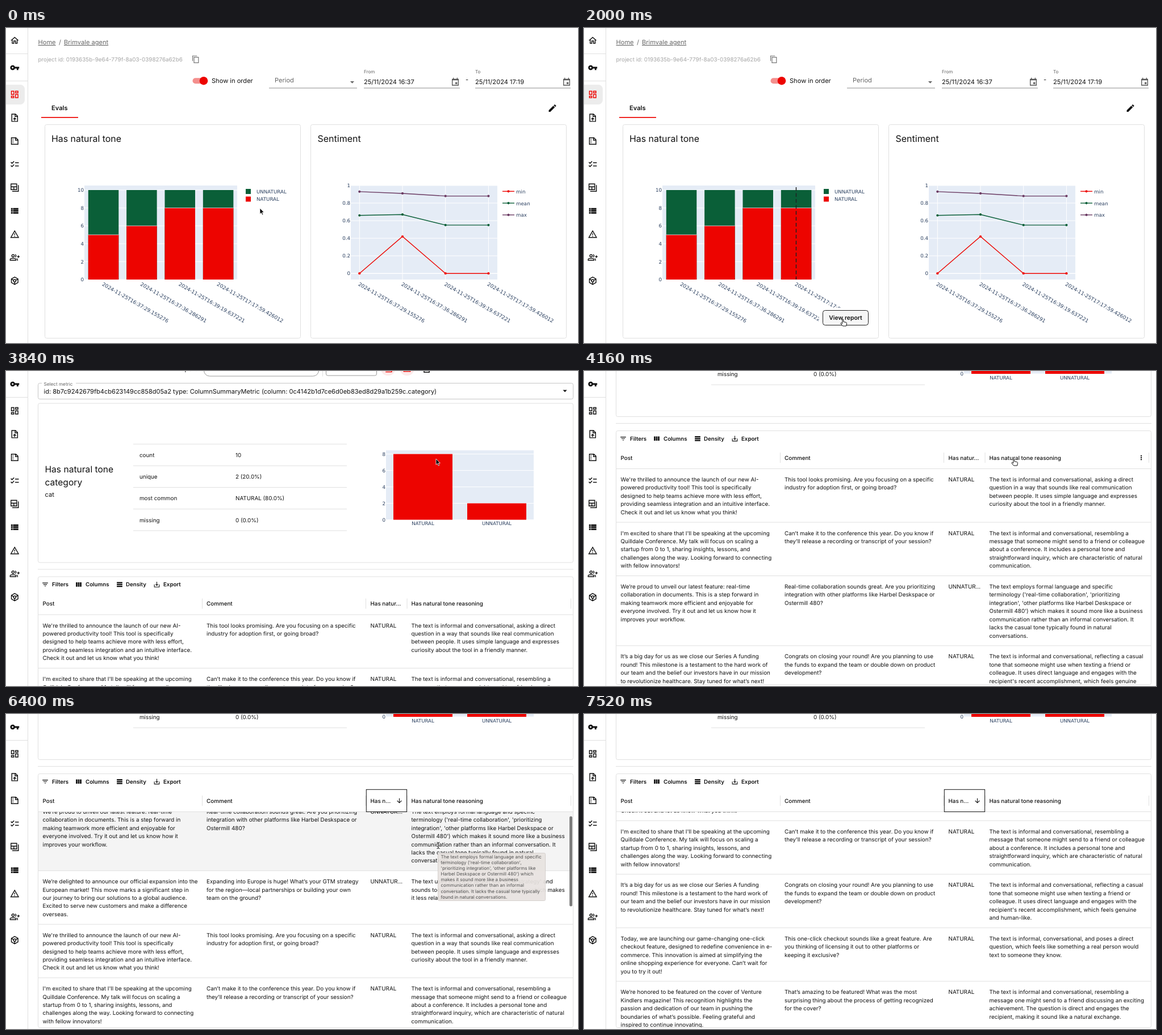
These frames come from a looping animation (1007 by 556 pixels, 7680 ms). An HTML page:

```html
<!DOCTYPE html>
<html lang="en">
<head>
<meta charset="utf-8">
<title>Evals dashboard</title>
<style>
  html, body { margin: 0; width: 100%; height: 100%; overflow: hidden; background: #fff; }
  svg { display: block; width: 1007px; height: 556px; }
  text { font-family: Inter, sans-serif; fill: #111; white-space: pre; text-rendering: geometricPrecision; }
  .plot { font-family: "DejaVu Sans", sans-serif; fill: #2a3f5f; }
  .end { text-anchor: end; }
  .mid { text-anchor: middle; }
  .med { font-weight: 500; }
  .bold { font-weight: 600; }
  .link { fill: #666; text-decoration: underline; }
  .dim { fill: #666; }
  .pale { fill: #a6a6a6; }
</style>
</head>
<body>
<svg id="stage" viewBox="0 0 1007 556" xmlns="http://www.w3.org/2000/svg"></svg>
<script>
const LOOP = 7680, SCROLL = 349, ROWS_TOP = 521.5, LINE = 14.42, PAD = 22.4;
const RED = '#ed0400', GREEN = '#0a5f38', PURPLE = '#6a3a62', GREY = '#e0e0e0', PLOT = '#e5ecf6', INK = '#111';
const BODY = 11.1, SMALL = 9.85, TICK = 8.7;

const outline = {
  home: 'M6 19V11H4.6L12 4.35 19.4 11H18v8h-4v-6h-4v6z',
  dash: 'M4 4h6v8H4zM14 4h6v4h-6zM14 12h6v8h-6zM4 16h6v4H4z',
  upload: 'M14 3H5v18h14V8zM13 3v6h6M12 19v-6M8.7 15.7 12 12.4l3.3 3.3',
  note: 'M15 4H4v16h16V9zM14 4v6h6M7 8h2M7 12h2M7 16h2',
  check: 'M13 8h9M13 16h9M2.7 6.8l2.8 2.8 5-5M2.7 14.8l2.8 2.8 5-5',
  table: 'M3 3h14v14H3zM3 10h14M10 10v7M21 6v15H6',
  warn: 'M12 4 2.7 20h18.6zM12 10v4M12 16v2',
  people: 'M11 8a3 3 0 1 1-6 0 3 3 0 0 1 6 0zM1 19v-2c0-4 14-4 14 0v2zM13 5c3 .5 3 5.5 0 6M17 14.5c2 1 2 2 2 5.5M21 7v6M18 10h6',
  cube: 'M12 3l8 4.5v9L12 21l-8-4.5v-9zM4 7.5l5 3M20 7.5l-5 3M12 21v-6M15 12a3 3 0 1 1-6 0 3 3 0 0 1 6 0z',
  copy: 'M16 2H3v15M7 6h13v16H7z',
  event: 'M4 5h16v16H4zM4 7h16M7 1v4M17 1v4M13 14h3v3h-3z',
  filter: 'M3 7h18M6 12h12M10 17h4',
  save: 'M4 12v8h16v-8M12 3v12M8 11l4 4 4-4',
  down: 'M12 4v15M5 12l7 7 7-7'
};
const solid = {
  key: 'M12.65 10a6 6 0 1 0 0 4H17v4h4v-4h2v-4zM5 12a2 2 0 1 0 4 0 2 2 0 1 0-4 0z',
  list: 'M3 5h4v4H3zM8 5h13v4H8zM3 10h4v4H3zM8 10h13v4H8zM3 15h4v4H3zM8 15h13v4H8z',
  pencil: 'M3 17.25V21h3.75L17.81 9.94l-3.75-3.75zM20.71 7.04a1 1 0 0 0 0-1.41l-2.34-2.34a1 1 0 0 0-1.41 0l-1.83 1.83 3.75 3.75z',
  columns: 'M3 5h5v14H3zM9.5 5h5v14h-5zM16 5h5v14h-5z',
  density: 'M3 4h18v4H3zM3 10h18v4H3zM3 16h18v4H3z',
  drop: 'M7 10l5 5 5-5z',
  dots: 'M10 4h4v4h-4zM10 10h4v4h-4zM10 16h4v4h-4z'
};

// Post | comment | label | reasoning, one entry per table row
const employs = ['The text employs formal language and specific'];
const rows = [
  [["We're thrilled to announce the launch of our new AI-", 'powered productivity tool! This tool is specifically', 'designed to help teams achieve more with less effort,', 'providing seamless integration and an intuitive interface.', 'Check it out and let us know what you think!'],
   ['This tool looks promising. Are you focusing on a specific', 'industry for adoption first, or going broad?'], 'NATURAL',
   ['The text is informal and conversational, asking a direct', 'question in a way that sounds like real communication', 'between people. It uses simple language and expresses', 'curiosity about the tool in a friendly manner.']],
  [["I'm excited to share that I'll be speaking at the upcoming", 'Quilldale Conference. My talk will focus on scaling a', 'startup from 0 to 1, sharing insights, lessons, and', 'challenges along the way. Looking forward to connecting', 'with fellow innovators!'],
   ['Can’t make it to the conference this year. Do you know if', 'they’ll release a recording or transcript of your session?'], 'NATURAL',
   ['The text is informal and conversational, resembling a', 'message that someone might send to a friend or colleague', 'about a conference. It includes a personal tone and', 'straightforward inquiry, which are characteristic of natural', 'communication.']],
  [['We’re proud to unveil our latest feature: real-time', 'collaboration in documents. This is a step forward in', 'making teamwork more efficient and enjoyable for', 'everyone involved. Try it out and let us know how it', 'improves your workflow.'],
   ['Real-time collaboration sounds great. Are you prioritizing', 'integration with other platforms like Harbel Deskspace or', 'Ostermill 480?'], 'UNNATUR...',
   [...employs, "terminology ('real-time collaboration', 'prioritizing", "integration', 'other platforms like Harbel Deskspace or", "Ostermill 480') which makes it sound more like a business", 'communication rather than an informal conversation. It', 'lacks the casual tone typically found in natural', 'conversations.']],
  [['It’s a big day for us as we close our Series A funding', 'round! This milestone is a testament to the hard work of', 'our team and the belief our investors have in our mission', 'to revolutionize healthcare. Stay tuned for what’s next!'],
   ['Congrats on closing your round! Are you planning to use', 'the funds to expand the team or double down on product', 'development?'], 'NATURAL',
   ['The text is informal and conversational, reflecting a casual', 'tone that someone might use when texting a friend or', 'colleague. It uses direct language and engages with the', "recipient's recent accomplishment, which feels genuine", 'and human-like.']],
  [['We’re delighted to announce our official expansion into the', 'European market! This move marks a significant step in', 'our journey to bring our solutions to a global audience.', 'Excited to serve new customers and make a difference', 'overseas.'],
   ['Expanding into Europe is huge! What’s your GTM strategy', 'for the region—local partnerships or building your own', 'team on the ground?'], 'UNNATUR...',
   ["The text uses business jargon like 'GTM strategy' and", 'sounds too formal for a casual conversation, which makes', 'it less relatable and natural.']],
  [['Today, we are launching our game-changing one-click', 'checkout feature, designed to redefine convenience in e-', 'commerce. This innovation is aimed at simplifying the', 'online shopping experience for everyone. Can’t wait for', 'you to try it out!'],
   ['This one-click checkout sounds like a great feature. Are', 'you thinking of licensing it out to other platforms or', 'keeping it exclusive?'], 'NATURAL',
   ['The text is informal, conversational, and poses a direct', 'question, which feels like something a real person would', 'text to someone they know.']],
  [['We’re honored to be featured on the cover of Venture', 'Kindlers magazine! This recognition highlights the', 'passion and dedication of our team in pushing the', 'boundaries of what’s possible. Feeling grateful and', 'inspired to continue innovating.'],
   ['That’s amazing to be featured! What was the most', 'surprising thing about the process of getting recognized', 'for the cover?'], 'NATURAL',
   ['The text is informal and conversational, resembling a', 'message one might send to a friend discussing an exciting', 'achievement. The question is direct and engages the', 'recipient, making it sound like a natural exchange.']]
];
const orders = { none: [0, 1, 2, 3, 4, 5, 6], asc: [0, 1, 3, 5, 6, 2, 4], desc: [2, 4, 0, 1, 3, 5, 6] };
const heights = rows.map(r => Math.max(r[0].length, r[1].length, r[3].length) * LINE + PAD);

// Drawing helpers; text is placed by the middle of its capitals
const text = (x, y, size, str, cls = '', extra = '') =>
  `<text x="${x}" y="${y + size * .36}" font-size="${size}" class="${cls}" ${extra}>${str}</text>`;
const rect = (x, y, w, h, fill = 'none', stroke = 'none', r = 0, extra = '') =>
  `<rect x="${x}" y="${y}" width="${w}" height="${h}" rx="${r}" fill="${fill}" stroke="${stroke}" ${extra}/>`;
const line = (x1, y1, x2, y2, color = GREY, w = 1, extra = '') =>
  `<path d="M${x1} ${y1}L${x2} ${y2}" stroke="${color}" stroke-width="${w}" ${extra}/>`;
const dot = (x, y, r, fill) => `<circle cx="${x}" cy="${y}" r="${r}" fill="${fill}"/>`;
const icon = (name, x, y, size = 17.3, color = INK, id = '') => {
  const look = outline[name] ? `fill="none" stroke="${color}" stroke-width="2"` : `fill="${color}" fill-rule="evenodd"`;
  return `<path id="${id}" transform="translate(${x - size / 2} ${y - size / 2}) scale(${size / 24})" d="${outline[name] || solid[name]}" ${look}/>`;
};
const group = (id, body, extra = '') => `<g id="${id}" ${extra}>${body}</g>`;
const para = (x, y, lines) => lines.map((s, i) => text(x, y + i * LINE, SMALL, s)).join('');

function sidebar() {
  const names = ['home', 'key', 'dash', 'upload', 'note', 'check', 'table', 'list', 'warn', 'people', 'cube'];
  return rect(-8, 100, 41, 35, '#ececec', 'none', 8, 'id="picked"') +
    line(0, 45.5, 38, 45.5) + line(0, 93.5, 38, 93.5) +
    names.map((n, i) => icon(n, 15.3, i < 2 ? 22 + 48 * i : 117.3 + 41.1 * (i - 2), 17.3, INK, 'nav-' + n)).join('');
}

function stamps(x, step) {
  return ['16:37:29.155276', '16:37:36.286291', '16:39:19.637221', '17:17:59.426012'].map((s, i) =>
    `<text class="plot" font-size="8.85" transform="translate(${x + i * step} 454) rotate(30)">2024-11-25T${s}</text>`).join('');
}

function barPlot() {
  let s = rect(138, 278, 269, 166, PLOT);
  for (let v = 0; v <= 10; v += 2) {
    const y = 444 - v * 15.8;
    s += line(138, y, 407, y, '#fff') + text(137, y, TICK, v, 'plot end');
  }
  [5, 6, 8, 8].forEach((v, i) => {
    const x = 144.8 + i * 67.35, y = 444 - v * 15.8;
    s += rect(x, 286, 53.5, 158, GREEN) + rect(x, y, 53.5, 444 - y, RED) + line(x, y, x + 53.5, y, PLOT, .8);
  });
  return s + stamps(168.5, 67.35) +
    rect(422, 284, 9, 9, GREEN) + text(441, 288.7, TICK, 'UNNATURAL', 'plot') +
    rect(422, 297.5, 9, 9, RED) + text(441, 302.3, TICK, 'NATURAL', 'plot');
}

function linePlot() {
  let s = rect(607, 278, 258, 166, PLOT);
  const px = i => 622.3 + i * 75.7, py = v => 433.2 - v * 155.2;
  for (let i = 0; i < 4; i++) s += line(px(i), 278, px(i), 444, '#fff');
  for (let k = 0; k <= 5; k++) {
    const y = py(k / 5);
    s += line(607, y, 865, y, '#fff', k ? 1 : 1.5) + text(606, y, TICK, k / 5, 'plot end');
  }
  const series = [['min', RED, [0, .42, 0, 0]], ['mean', GREEN, [.66, .67, .55, .55]], ['max', PURPLE, [.93, .91, .88, .88]]];
  series.forEach(([name, color, vals], k) => {
    const y = 288.3 + k * 20.8;
    s += `<polyline fill="none" stroke="${color}" stroke-width="1.4" points="${vals.map((v, i) => px(i) + ',' + py(v)).join(' ')}"/>` +
      vals.map((v, i) => dot(px(i), py(v), 2.1, color)).join('') +
      line(874, y, 895, y, color, 1.4) + dot(884.5, y, 2.1, color) + text(898, y + .3, TICK, name, 'plot');
  });
  return s + stamps(619.5, 75.7);
}

function dashboard() {
  const field = (x, label, value, iconX, end) => text(x, 77.3, 8.1, label, 'dim') + text(x, 95, BODY, value) +
    icon('event', iconX, 95, 16, '#555') + line(x, 106, end, 106, '#8c8c8c');
  return rect(328.5, 88.3, 24, 10, '#f48f8d', 'none', 5) + dot(348, 93.2, 7.3, RED) + text(362, 93.3, BODY, 'Show in order') +
    text(473, 92.3, BODY, 'Period', 'dim') + icon('drop', 609.5, 95.5, 17, '#666') + line(463, 106, 618, 106, '#8c8c8c') +
    field(630, 'From', '25/11/2024 16:37', 791, 799) + text(809, 91, BODY, '-') + field(826, 'To', '25/11/2024 17:19', 987, 994) +
    text(80, 141.5, BODY, 'Evals', 'bold') + rect(62, 157, 65, 1.7, RED) + icon('pencil', 962, 141.5) +
    rect(68.5, 170.5, 450, 377, '#fff', GREY, 3) + text(80, 195, 15.9, 'Has natural tone') + barPlot() +
    rect(536.5, 170.5, 450, 377, '#fff', GREY, 3) + text(548.5, 195, 16, 'Sentiment') + linePlot() +
    group('report', line(373.5, 281, 373.5, 444, '#222', 1.5, 'stroke-dasharray="6.5 4"') +
      rect(414, 494, 93, 37, '#fff') + rect(420.5, 498.5, 80, 26, '#f6f6f6', '#222', 4) +
      text(460.5, 511.5, 10.4, 'View report', 'bold mid'));
}

function summary() {
  let s = rect(56.5, 148.5, 942, 281, '#fff', GREY, 3) +
    text(68.5, 265, 15.6, 'Has natural tone') + text(68.5, 288, 15.6, 'category') + text(68.5, 309.5, BODY, 'cat') +
    line(224, 220.5, 600, 220.5);
  [['count', '10'], ['unique', '2 (20.0%)'], ['most common', 'NATURAL (80.0%)'], ['missing', '0 (0.0%)']].forEach(([a, b], i) => {
    const y = 240 + i * 38.2;
    s += text(235, y, SMALL, a) + text(404, y, SMALL, b) + line(224, y + 18.7, 600, y + 18.7);
  });
  s += rect(669, 231.5, 260, 122.5, PLOT);
  for (let v = 0; v <= 8; v += 2) {
    const y = 354 - v * 14.5;
    s += line(669, y, 929, y, '#fff') + text(668, y, TICK, v, 'plot end');
  }
  return s + rect(682, 238, 104, 116, RED) + rect(812, 325, 104, 29, RED) +
    text(734, 360.5, 8.6, 'NATURAL', 'plot mid') + text(864, 360.5, 8.6, 'UNNATURAL', 'plot mid');
}

function grid() {
  const tools = [['filter', 69, 'Filters', 81], ['columns', 128, 'Columns', 140], ['density', 200, 'Density', 211], ['save', 265.5, 'Export', 277]];
  const body = rows.map((r, i) => group('row' + i,
    rect(57, 0, 941, heights[i], '#f4f4f4', 'none', 0, `id="hover${i}"`) +
    para(64.5, 19, r[0]) + para(353, 19, r[1]) + text(641.5, 19, SMALL, r[2]) + para(713.5, 19, r[3]) +
    line(57, heights[i], 998, heights[i]))).join('');
  return line(56, 441.5, 999, 441.5) + rect(56.5, 454.5, 942, 448, '#fff', GREY, 3) +
    tools.map(([n, x, s, tx]) => icon(n, x, 468.3, 13) + text(tx, 468.3, 9.7, s, 'bold')).join('') +
    [345.5, 633.5, 706, 994.5].map(x => line(x, 493, x, 511)).join('') +
    text(64.5, 502, SMALL, 'Post', 'med') + text(353, 502, SMALL, 'Comment', 'med') +
    text(641.5, 502, SMALL, 'Has natur...', 'med', 'id="label"') + text(713.5, 502, SMALL, 'Has natural tone reasoning', 'med') +
    icon('dots', 981, 502, 13, INK, 'dotsReason') + icon('dots', 692.5, 502, 13, INK, 'dotsTone') +
    `<circle id="halo" cx="672.5" cy="502" r="10" fill="#fbe3e3"/>` +
    group('sort', icon('down', 0, 0, 13, 'inherit')) +
    line(57, ROWS_TOP, 998, ROWS_TOP) +
    `<clipPath id="body"><rect x="57" y="522" width="941" height="380"/></clipPath>` +
    group('', group('rows', body), 'clip-path="url(#body)"') +
    rect(634.3, 482.3, 71.3, 39.3, 'none', '#111', 0, 'id="focus"');
}

function explore() {
  return text(184, 25, BODY, '/', 'dim') + text(193.5, 25, BODY, 'Explore', 'link') +
    text(301, 87, BODY, 'Report') + rect(348.5, 72.5, 202, 28, '#fff', '#9a9a9a', 10) +
    text(357, 86.7, 8.9, '01936454-7f01-7476-ac5e-def21ae7849f') + line(557.5, 72, 557.5, 101) +
    rect(563.5, 73.5, 89, 26, '#fff', '#9a9a9a', 3) + text(608, 87, 10.3, 'Go to dataset', 'bold mid dim') +
    dot(672.5, 86.7, 13, '#fdeaea') + icon('table', 672.5, 86.7, 17, RED) +
    dot(706, 86.7, 13, '#fdeaea') + icon('note', 706, 86.7, 17, RED) + icon('copy', 739.5, 86.7, 17) +
    rect(56.5, 113, 942, 28, '#fff', '#c6c6c6', 3) + rect(63, 110, 60, 6, '#fff') + text(66.5, 114.5, 8.2, 'Select metric', 'dim') +
    text(66.5, 127.3, 11.05, 'id: 8b7c9242679fb4cb623149cc858d05a2 type: ColumnSummaryMetric (column: 0c4142b1d7ce6d0eb83ed8d29a1b259c.category)') +
    icon('drop', 984, 126.5) + summary() + grid();
}

function tooltip() {
  const lines = [...employs, "terminology ('real-time collaboration',", "'prioritizing integration', 'other platforms like", "Harbel Deskspace or Ostermill 480') which",
    'makes it sound more like a business', 'communication rather than an informal', 'conversation. It lacks the casual tone typically', 'found in natural conversations.'];
  return rect(760.5, 245.5, 189, 84, '#e8e3e0', '#d3cecb', 2) +
    lines.map((s, i) => text(765.5, 251.8 + i * 10.15, 8.03, s, '', 'style="fill:#444"')).join('');
}

const pointers = `<path id="arrow" d="M0 0v10.4l2.4-2.2 1.7 3.9 1.7-.8-1.7-3.7h3.2z" fill="#000" stroke="#fff" stroke-width=".8"/>
<path id="hand" d="M-1.2 1c0-1.3 2-1.3 2 0v3.6l4.2.9c1.3.3 1.7 1 1.5 2.2l-.8 4.3h-6.2l-3.4-4.2c-.7-1.1.7-1.9 1.5-1.1l1.2 1.1z" fill="#fff" stroke="#111"/>
<path id="beam" d="M-2.5-5.5q2.5 0 2.5 1.5 0-1.5 2.5-1.5M0-4v8M-2.5 5.5q2.5 0 2.5-1.5 0 1.5 2.5 1.5" fill="none" stroke="#111"/>`;

document.getElementById('stage').innerHTML =
  rect(0, 0, 1007, 556, '#fff') +
  group('page', text(56.5, 25, BODY, 'Home', 'link') + text(93, 25, BODY, '/', 'dim') + text(102, 25, BODY, 'Brimvale agent', 'link') +
    text(56.5, 55.3, SMALL, 'project id: 0193635b-9e64-779f-8a03-0398276a62b6', 'pale') + icon('copy', 334, 55.3, 14.5, '#777') +
    group('dashboard', dashboard()) + group('explore', explore())) +
  group('side', sidebar()) + line(38.5, 0, 38.5, 556) +
  rect(992, 0, 5, 159, '#7c7c7c', 'none', 2.5, 'id="thumb"') +
  group('tip', tooltip()) + group('cursor', pointers);

const $ = id => document.getElementById(id);
const show = (id, on) => $(id).setAttribute('visibility', on ? 'inherit' : 'hidden');
const fade = (id, v) => $(id).setAttribute('opacity', v);
const move = (id, x, y) => $(id).setAttribute('transform', `translate(${x} ${y})`);
const part = (t, a, b) => Math.min(1, Math.max(0, (t - a) / (b - a)));
const ease = (t, a, b) => { const u = part(t, a, b); return u * u * (3 - 2 * u); };

const pageScroll = t => SCROLL * ease(t, 3680, 4160);
const gridScroll = t => 180 * ease(t, 6320, 6720) + 116.5 * ease(t, 6800, 7280);

// start, end, target x, target y
const trips = [[480, 800, 376, 372], [1600, 2000, 456, 514], [3120, 3520, 757, 155], [4480, 4960, 677, 156], [5280, 5680, 761, 232]];
function pointerAt(t) {
  let x = 447, y = 318;
  for (const [a, b, tx, ty] of trips) {
    const u = ease(t, a, b);
    x += (tx - x) * u;
    y += (ty - y) * u;
  }
  return [x, y];
}

function draw(t) {
  const first = t < 2480, scroll = pageScroll(t), [x, y] = pointerAt(t);
  const inside = (l, r, top, bottom) => x > l && x < r && y > top && y < bottom;
  const headTop = 482 - scroll, rowsTop = ROWS_TOP - scroll;
  const onHead = !first && inside(57, 998, headTop, rowsTop);
  const onBody = !first && inside(57, 998, rowsTop, 553) && t < 7440;

  show('dashboard', first);
  show('explore', !first);
  show('picked', first);
  $('nav-dash').setAttribute('stroke', first ? RED : INK);
  fade('report', part(t, 1200, 1440));
  move('page', 0, -scroll);
  move('side', 0, -Math.min(47, scroll));

  const sorted = t < 5120 ? 'none' : t < 5200 ? 'asc' : 'desc';
  const onTone = onHead && x > 634 && x < 706;
  $('label').textContent = onTone ? 'H...' : sorted === 'none' ? 'Has natur...' : 'Has n...';
  show('dotsTone', onTone);
  show('dotsReason', onHead && x > 706);
  show('halo', onTone && x < 684);
  show('focus', sorted !== 'none');
  show('sort', onTone || sorted !== 'none');
  $('sort').setAttribute('transform', `translate(${onTone ? 672.5 : 692.5} 502) rotate(${sorted === 'desc' ? 0 : 180})`);
  $('sort').firstChild.setAttribute('stroke', onTone ? RED : INK);
  fade('sort', sorted === 'none' ? .5 : 1);

  // Row hover follows the scroll with a short delay
  const rolled = gridScroll(t), under = y - rowsTop + gridScroll(t - 160);
  move('rows', 0, ROWS_TOP - rolled);
  let top = 0;
  for (const i of orders[sorted]) {
    move('row' + i, 0, top);
    show('hover' + i, onBody && under >= top && under < top + heights[i]);
    top += heights[i];
  }
  $('thumb').setAttribute('y', 173 + rolled * .395);
  fade('thumb', t < 6400 ? 0 : 1 - part(t, 7360, 7520));
  fade('tip', .93 * part(t, 5680, 5840) * (1 - part(t, 6720, 7040)));

  const onBar = first && inside(347, 400, 286, 444), onButton = first && t > 1280 && inside(420, 501, 498, 525);
  const kind = onBar || onButton || onHead ? 'hand' : onBody ? 'beam' : 'arrow';
  for (const k of ['arrow', 'hand', 'beam']) show(k, k === kind);
  show('cursor', t < 7440);
  move('cursor', x, y);
}

const start = performance.now();
function tick() {
  draw((performance.now() - start) % LOOP);
  requestAnimationFrame(tick);
}
tick();
</script>
</body>
</html>
```
